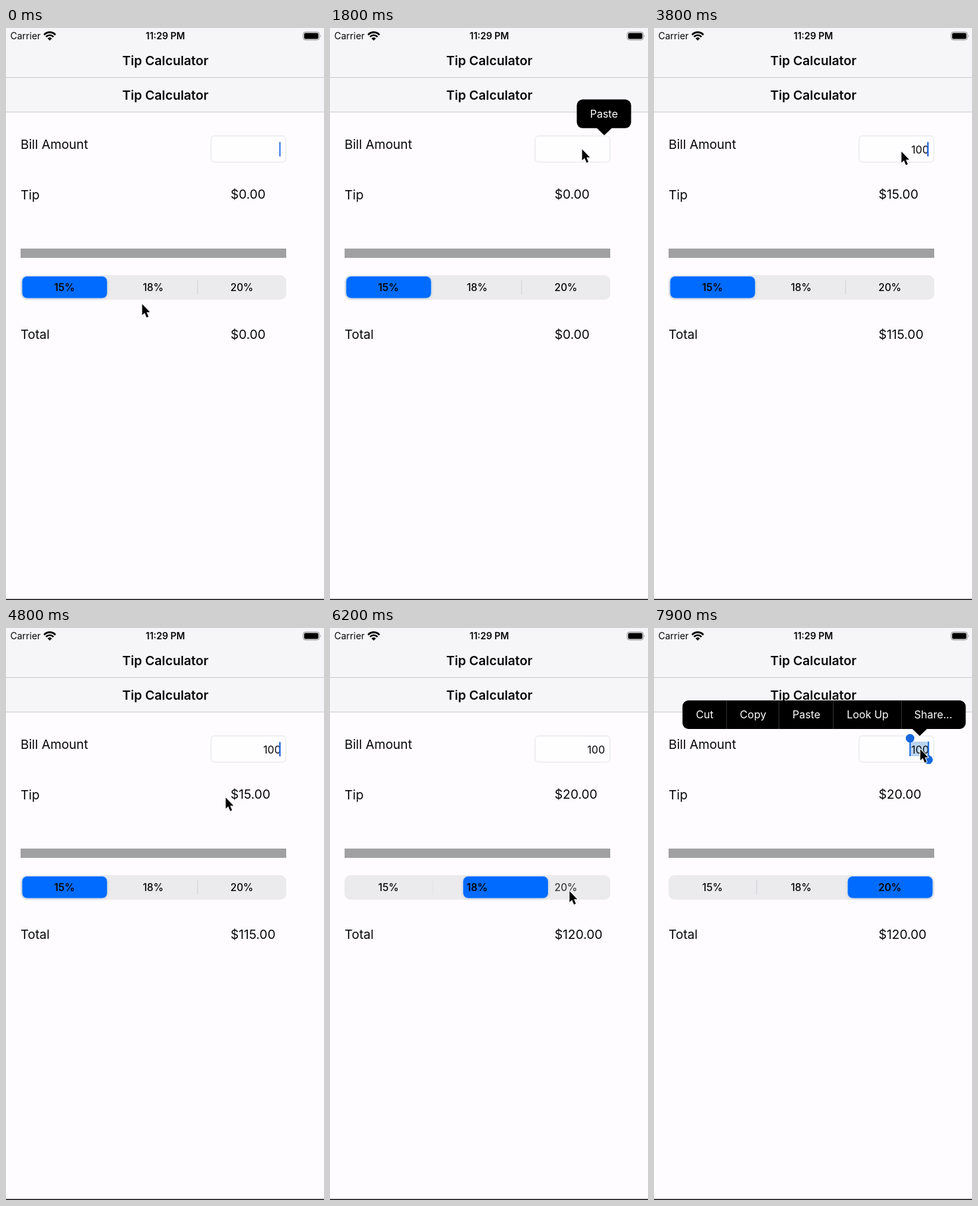
Write an HTML page that moves like this. It is 480 px wide and 861 px high and loops after 8 s.

```html
<!DOCTYPE html>
<html lang="en">
<head>
<meta charset="utf-8">
<title>Tip Calculator</title>
<style>
  html, body { margin: 0; width: 100%; height: 100%; overflow: hidden; background: #fefcff; }
  svg { display: block; width: 100vw; height: 100vh; }
  text { font: 19.1px Inter, "Liberation Sans", sans-serif; fill: #060607; white-space: pre; }
  .mid { text-anchor: middle; }
  .end { text-anchor: end; font-size: 16px; }
  .title { font-weight: 600; font-size: 19.3px; }
  .status { font-size: 14px; }
  .clock { font-weight: 600; }
  .seg text { font-size: 15.3px; font-weight: 500; }
  .menu text { font-size: 16px; fill: #fff; }
</style>
</head>
<body>
<svg viewBox="0 0 480 861">
  <defs>
    <clipPath id="fan"><path d="M66 19L52 5V0H80V5Z"/></clipPath>
    <filter id="soft" x="-20%" y="-40%" width="140%" height="180%"><feGaussianBlur stdDeviation="2"/></filter>
  </defs>

  <rect width="480" height="861" fill="#fefcff"/>
  <rect width="480" height="126" fill="#f6f5f7"/>
  <path d="M0 74.5H480M0 126.5H480" stroke="#cbcacd"/>
  <rect y="859.5" width="480" height="1.5" fill="#111"/>

  <text class="status" x="6.5" y="17">Carrier</text>
  <g clip-path="url(#fan)" fill="none" stroke="#000" stroke-width="2.6">
    <circle cx="66" cy="18" r="11.6"/>
    <circle cx="66" cy="18" r="7.3"/>
    <circle cx="66" cy="18" r="3.8" fill="#000" stroke="none"/>
  </g>
  <text class="status clock mid" x="240.5" y="17">11:29 PM</text>
  <rect x="448.5" y="6" width="24.5" height="12" rx="3.5" fill="none" stroke="#8e8d90"/>
  <rect x="450" y="7.5" width="21.5" height="9" rx="2" fill="#000"/>
  <path d="M474.5 10q1.8 2 0 4z" fill="#8e8d90"/>

  <text class="title mid" x="240.5" y="56">Tip Calculator</text>
  <text class="title mid" x="240.5" y="107.5">Tip Calculator</text>

  <text x="22" y="182">Bill Amount</text>
  <text x="22" y="258">Tip</text>
  <text x="22" y="468">Total</text>
  <text id="tip" x="339" y="257"></text>
  <text id="total" x="339" y="468"></text>

  <rect x="309.5" y="162.5" width="113" height="39.5" rx="5" fill="#fefdff" stroke="#e3e2e5"/>
  <rect id="select" x="386" y="171" width="28.5" height="22" fill="#bad3f0"/>
  <text id="bill" class="end" x="415" y="188.5"></text>
  <rect id="caret" x="412.3" y="171.5" width="2.3" height="22" rx="1" fill="#2369de"/>
  <g id="handles" fill="#1568df">
    <path d="M385.5 168h2v25h-2zM413.3 171h2v25h-2z"/>
    <circle cx="386.5" cy="166" r="6.5"/>
    <circle cx="414.3" cy="198.3" r="6.5"/>
  </g>

  <rect x="22" y="332" width="401" height="14" fill="#a09fa1"/>

  <g class="seg">
    <rect x="22" y="372" width="401" height="37" rx="9" fill="#ebeaed"/>
    <path id="sep0" d="M154.8 380V401" stroke="#cfced2"/>
    <path id="sep1" d="M289.2 380V401" stroke="#cfced2"/>
    <g id="pill">
      <rect x="24" y="375.5" width="129" height="32" rx="8" fill="#000" opacity=".13" filter="url(#soft)"/>
      <rect x="24" y="373.5" width="129" height="33.5" rx="8" fill="#006bff" stroke="#c9dff0"/>
    </g>
    <text class="mid pct" x="88.2" y="396">15%</text>
    <text class="mid pct" x="222" y="396">18%</text>
    <text class="mid pct" x="356" y="396">20%</text>
  </g>

  <g id="paste" class="menu">
    <path d="M402 150H426L414 161.5Z"/>
    <rect x="372.5" y="107.5" width="82" height="43.3" rx="9"/>
    <text class="mid" x="413.5" y="135">Paste</text>
  </g>
  <g id="edit" class="menu">
    <path d="M389 151H413L401 162.5Z"/>
    <rect x="43" y="109" width="427.5" height="43" rx="9"/>
    <path d="M109.5 109V152M188.5 109V152M270.5 109V152M373.5 109V152" stroke="#303030"/>
    <text class="mid" x="76.5" y="136">Cut</text>
    <text class="mid" x="149.5" y="136">Copy</text>
    <text class="mid" x="230" y="136">Paste</text>
    <text class="mid" x="322.5" y="136">Look Up</text>
    <text class="mid" x="421.5" y="136">Share...</text>
  </g>

  <path id="cursor" d="M0 0V16.8L3.8 13.3L6.7 20.2L9.6 19L6.7 12.2H11.8Z"
        stroke="#fff" stroke-width="2" stroke-linejoin="round" paint-order="stroke"/>
</svg>

<script>
const LOOP = 8000, STEP = 100;
const PICK_18 = 5400, PICK_20 = 6100, SELECT = 7500;
const RATES = [.15, .18, .2];

// time, x, y of the pointer tip
const PATH = [
  [0, 205.5, 415.5], [300, 365, 146], [500, 379, 184], [700, 380.5, 182.5],
  [2900, 380.5, 182.5], [3300, 373.5, 186], [4700, 373.5, 186], [5000, 212, 453],
  [5300, 204, 387], [5600, 204, 387], [6000, 361.5, 396], [6200, 361.5, 396],
  [6400, 400, 370], [6800, 450, 300], [7300, 404, 184], [7600, 403, 184], [7900, 402, 182.5]
];

const $ = id => document.getElementById(id);
const labels = document.querySelectorAll('.pct');
const clamp = v => Math.max(0, Math.min(1, v));
const ramp = (t, from, to) => clamp((t - from) / (to - from));
const fade = (id, v) => $(id).setAttribute('opacity', v);
const move = (id, x, y) => $(id).setAttribute('transform', `translate(${x} ${y})`);

// critically damped spring from 0 to 1
function spring(ms) {
  const k = Math.max(0, ms) * .0115;
  return 1 - (1 + k) * Math.exp(-k);
}

function pointer(t) {
  const i = PATH.findIndex(p => p[0] > t);
  if (i < 0) return PATH[PATH.length - 1].slice(1);
  const a = PATH[i - 1], b = PATH[i];
  const u = ramp(t, a[0], b[0]), e = u * u * (3 - 2 * u);
  return [a[1] + (b[1] - a[1]) * e, a[2] + (b[2] - a[2]) * e];
}

function blink(t) {
  if (t >= SELECT) return 0;
  const p = (t < 2300 ? t + 960 : Math.max(0, t - 2600)) % 1000;
  return p < 600 ? 1 - ramp(p, 360, 460) : ramp(p, 840, 980);
}

function draw(t) {
  const bill = t < 2300 ? '' : t < 2400 ? '1' : t < 2600 ? '10' : '100';
  const choice = (t >= PICK_18) + (t >= PICK_20);
  const tip = bill * RATES[choice];
  $('bill').textContent = bill;
  $('tip').textContent = '$' + tip.toFixed(2);
  $('total').textContent = '$' + (+bill + tip).toFixed(2);

  const pos = spring(t - PICK_18) + spring(t - PICK_20);
  move('pill', pos * 134, 0);
  fade('sep0', clamp(pos - 1));
  fade('sep1', clamp(1 - pos));
  labels.forEach((label, i) => {
    label.style.fontWeight = i === Math.round(pos) ? 600 : 500;
    label.style.opacity = i === choice ? 1 - .37 * Math.abs(pos - i) : 1;
  });

  fade('caret', blink(t));
  fade('select', ramp(t, SELECT - 50, SELECT + 50));
  fade('handles', ramp(t, SELECT + 60, SELECT + 300));
  fade('paste', ramp(t, 1400, 1600) * (1 - ramp(t, 2150, 2350)));
  fade('edit', ramp(t, 7650, 7850));
  move('cursor', ...pointer(t));
}

function tick() {
  draw(Math.floor(performance.now() / STEP) * STEP % LOOP);
  requestAnimationFrame(tick);
}
tick();
</script>
</body>
</html>
```
